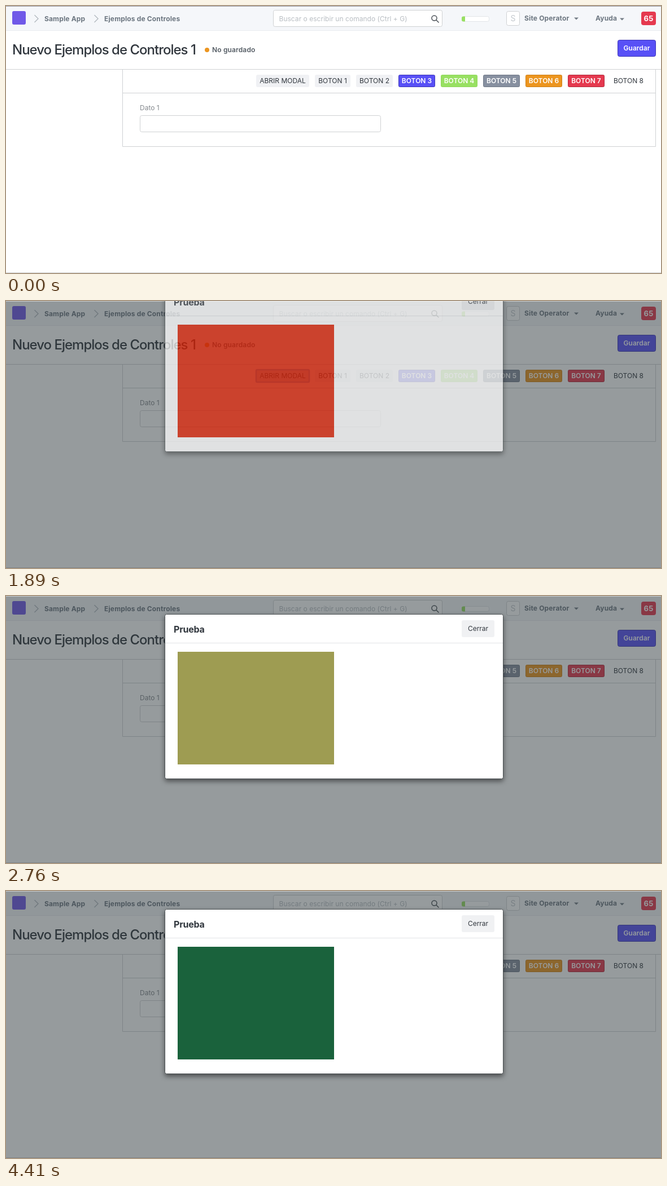
Animation of 1160x474 px, one loop 4440 ms. Source, as an HTML page:

```html
<!DOCTYPE html>
<html lang="es">
<head>
<meta charset="utf-8">
<style>
  html, body { margin: 0; width: 100%; height: 100%; overflow: hidden; background: #fff; }
  svg { display: block; font: 12px Inter, Roboto, sans-serif; fill: #30363d; }
  .bold { font-weight: 700; fill: #6c7680; letter-spacing: .15px; }
  .mid { text-anchor: middle; }
  .line { fill: none; stroke: #cfd1d3; }
  #dialog { filter: drop-shadow(0 4px 4px rgba(0, 0, 0, .5)); }
</style>
</head>
<body>
<svg width="1160" height="474" viewBox="0 0 1160 474">
  <rect width="1160" height="43" fill="#f5f7fa"/>
  <path class="line" d="M0 43.5H1160" style="stroke:#e9ecf0"/>
  <rect x="11" y="9" width="24" height="24" rx="3" fill="#7059e8"/>
  <path d="M50.5 16l6.5 6.5-6.5 6.5M156.5 16l6.5 6.5-6.5 6.5" fill="none" stroke="#b4bac0" stroke-width="1.4"/>
  <text class="bold" x="68" y="27">Sample App</text>
  <text class="bold" x="174" y="27">Ejemplos de Controles</text>

  <rect class="line" x="473.5" y="7.5" width="299" height="29" rx="3" style="fill:#fff"/>
  <text x="483.5" y="27" fill="#b9bec3" letter-spacing=".03">Buscar o escribir un comando (Ctrl + G)</text>
  <path d="M762 25l4.500 4.500M763 21.500a4.500 4.500 0 1 1-9 0a4.500 4.500 0 1 1 9 0" fill="none" stroke="#4b5157" stroke-width="1.5"/>
  <rect x="807.5" y="18.5" width="48" height="9" rx="3" fill="#fff" stroke="#e2e5e8"/>
  <path d="M813 18.500h-3a3 3 0 0 0-3 3v3a3 3 0 0 0 3 3h3z" fill="#98e062"/>
  <rect class="line" x="886.5" y="9.5" width="23" height="25" rx="3" style="fill:#fff"/>
  <text class="mid" x="898" y="27" font-size="14" fill="#c4c9ce">S</text>
  <text class="bold" x="918" y="26">Site Operator</text>
  <text class="bold" x="1044" y="26">Ayuda</text>
  <path d="M1006 20.500h8l-4 4zM1087 21.500h8l-4 4z" fill="#737c85"/>
  <rect x="1125" y="10" width="26" height="24" rx="4" fill="#e5394f"/>
  <text class="bold mid" x="1138" y="26.5" font-size="13" style="fill:#fff">65</text>

  <text x="11" y="86" font-size="24" font-weight="500" style="letter-spacing:-1px">Nuevo Ejemplos de Controles 1</text>
  <circle cx="356" cy="78" r="4" fill="#ec9520"/>
  <text class="bold" x="365" y="82" style="fill:#535b63;font-weight:600">No guardado</text>
  <rect x="1083.5" y="60.5" width="67" height="29" rx="3" fill="#5850f6" stroke="#3e36b8"/>
  <text class="mid" x="1117" y="79" fill="#fff" font-weight="600">Guardar</text>

  <path class="line" d="M0 112.500H1160M206.500 113V249.500H1150.500V113M207 154.500H1150"/>
  <g id="buttons"></g>
  <text x="237" y="185" fill="#85898e">Dato 1</text>
  <rect class="line" x="237.5" y="194.5" width="426" height="29" rx="3"/>
  <g id="focus">
    <rect x="443" y="122" width="94" height="22" rx="2" fill="#c5d0da" stroke="#7eb0e4" stroke-width="2.5"/>
    <text class="mid" x="490" y="137">ABRIR MODAL</text>
  </g>
  <path class="line" d="M0 473.500H1160"/>

  <rect id="backdrop" width="1160" height="474" fill="#2e383c"/>
  <path id="edge" d="M0 .5H1160"/>
  <g id="dialog">
    <rect x="281.5" y="32.5" width="599" height="292" rx="3" fill="#fff" stroke="#4c5254"/>
    <path d="M282 83.500H880" stroke="#e2e4e6"/>
    <text x="297" y="65" font-size="16" font-weight="700" letter-spacing="-.2">Prueba</text>
    <rect x="807" y="43" width="58" height="30" rx="3" fill="#f0f1f3"/>
    <text class="mid" x="836" y="62">Cerrar</text>
    <rect id="swatch" x="304" y="99" width="277" height="200"/>
  </g>
</svg>
<script>
const LOOP = 4440, CLICK = 1530, FADE = 1640, SLIDE = 1785;
const $ = id => document.getElementById(id);
const clamp = v => Math.max(0, Math.min(1, v));

// label, left, width, fill, border
const buttons = [
  ["ABRIR MODAL", 443, 94, "#f0f1f4"],
  ["BOTON 1", 547, 63, "#f0f1f4"],
  ["BOTON 2", 620, 65, "#f0f1f4"],
  ["BOTON 3", 695, 65, "#5850f6", "#3e36b8"],
  ["BOTON 4", 770, 65, "#98e062", "#8fd85a"],
  ["BOTON 5", 845, 65, "#8790a0", "#6f7887"],
  ["BOTON 6", 920, 65, "#ec951f", "#cf8017"],
  ["BOTON 7", 995, 65, "#e5394f", "#b32a3c"],
  ["BOTON 8", 1070, 65, "none"]
];
$("buttons").innerHTML = buttons.map(([label, x, w, fill, edge]) =>
  `<rect x="${x + .5}" y="122.5" width="${w - 1}" height="21" rx="2" fill="${fill}" stroke="${edge || fill}"/>
   <text class="mid" x="${x + w / 2}" y="137" ${edge ? 'fill="#fff" font-weight="600"' : ""}>${label}</text>`
).join("");

// time, red, green, blue
const colors = [
  [1980, 225, 30, 0], [2250, 244, 194, 24], [2360, 240, 235, 20],
  [2970, 115, 115, 115], [3450, 22, 28, 233], [3555, 8, 16, 245], [4410, 26, 98, 60]
];

function colorAt(t) {
  let i = 1;
  while (i < colors.length - 1 && t > colors[i][0]) i++;
  const a = colors[i - 1], b = colors[i], k = clamp((t - a[0]) / (b[0] - a[0]));
  return `rgb(${[1, 2, 3].map(c => Math.round(a[c] + (b[c] - a[c]) * k))})`;
}

// cubic-bezier(0, 0, .58, 1), solved by bisection
function easeOut(x) {
  let lo = 0, hi = 1, s = .5;
  for (let i = 0; i < 20; i++) {
    s = (lo + hi) / 2;
    if (1.74 * s * s * (1 - s) + s ** 3 < x) lo = s; else hi = s;
  }
  return s * s * (3 - 2 * s);
}

function draw(now) {
  const t = now % LOOP, move = easeOut(clamp((t - SLIDE) / 300));
  $("focus").setAttribute("opacity", t >= CLICK ? 1 : 0);
  $("backdrop").setAttribute("opacity", .5 * clamp((t - FADE) / 150));
  $("edge").setAttribute("stroke", t < FADE ? "#9a9ba3" : "#c9cccd");
  $("dialog").setAttribute("opacity", clamp((t - SLIDE) / 150));
  $("dialog").setAttribute("transform", `translate(0 ${Math.round(-118 * (1 - move))})`);
  $("swatch").setAttribute("fill", colorAt(t));
  requestAnimationFrame(draw);
}
draw(performance.now());
</script>
</body>
</html>
```
